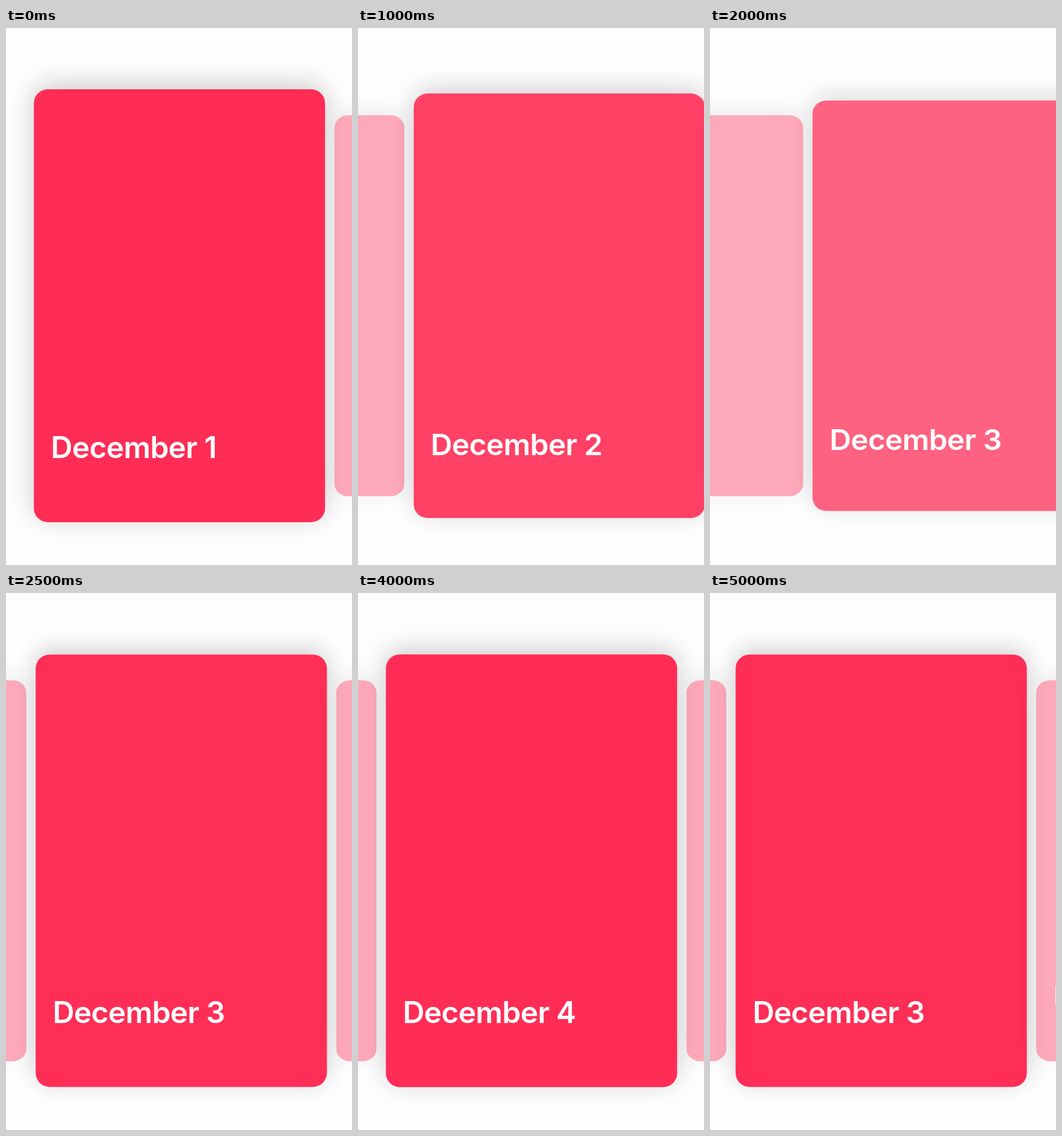
An HTML page that plays this animation: 600x929 px, repeating every 5100 ms.

```html
<!DOCTYPE html>
<html lang="en">
<head>
<meta charset="utf-8">
<title>Date cards</title>
<style>
  html, body {
    margin: 0;
    width: 100%;
    height: 100%;
    overflow: hidden;
    background: #fefdfe;
  }
  .stage {
    position: relative;
    width: 600px;
    height: 929px;
    overflow: hidden;
  }
  .card {
    position: absolute;
    left: 0;
    top: 106px;
    width: 505px;
    height: 749px;
    border-radius: 24px;
    background: #ff2d55;
    box-shadow: 0 -8px 44px rgba(0, 0, 0, .2);
  }
  .card span {
    position: absolute;
    left: 29.5px;
    bottom: 91px;
    font: 600 52px/76px Inter, sans-serif;
    letter-spacing: -.8px;
    white-space: nowrap;
    color: #fff;
  }
</style>
</head>
<body>
<div class="stage"></div>
<script>
  const LOOP = 5100, STEP = 100;
  const WIDTH = 505, PITCH = 521.3, CENTER = 300;
  const FADE = 300;               // distance over which a card shrinks and pales
  const DRAG = 150, TAU = 120;    // finger drag, then exponential settling (ms)
  const ACCEL = 1 / (2 * DRAG * TAU + DRAG * DRAG);

  // Left edge of the first card at rest, before any swipe.
  const START = 48.3;
  const swipes = [
    { at: 620,  to: 49.5 - PITCH },
    { at: 1740, to: 49.5 - 2 * PITCH },
    { at: 2836, to: START - 3 * PITCH },
    { at: 4340, to: 49 - 2 * PITCH }
  ];

  const stage = document.querySelector('.stage');
  const cards = [1, 2, 3, 4, 5].map(day => {
    const card = document.createElement('div');
    const label = document.createElement('span');
    card.className = 'card';
    label.textContent = `December ${day}`;
    card.append(label);
    stage.append(card);
    return card;
  });

  function swipeProgress(ms) {
    if (ms <= 0) return 0;
    if (ms < DRAG) return ACCEL * ms * ms;
    return 1 - (1 - ACCEL * DRAG * DRAG) * Math.exp((DRAG - ms) / TAU);
  }

  function scrollAt(time) {
    let x = START;
    for (const { at, to } of swipes) x += (to - x) * swipeProgress(time - at);
    return x;
  }

  function draw(time) {
    const first = scrollAt(time);
    cards.forEach((card, i) => {
      const x = first + i * PITCH;
      const away = Math.min(1, Math.abs(x + WIDTH / 2 - CENTER) / FADE);
      card.style.transform = `translateX(${x}px) scaleY(${1 - .12 * away})`;
      card.style.opacity = 1 - .6 * away;
    });
  }

  const begin = performance.now();
  function tick() {
    const time = (performance.now() - begin) % LOOP;
    draw(Math.floor(time / STEP) * STEP);
    requestAnimationFrame(tick);
  }
  tick();
</script>
</body>
</html>
```
